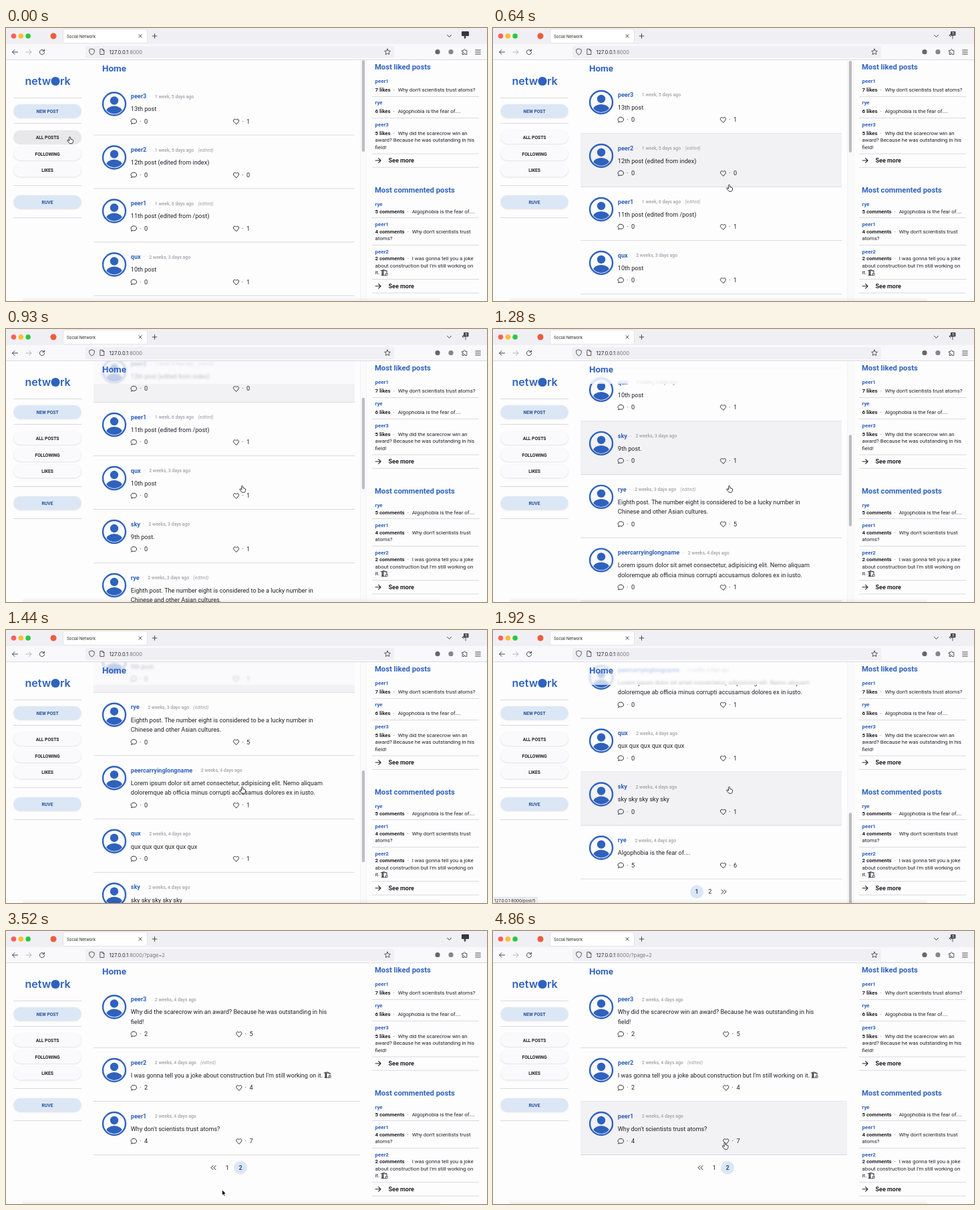
An HTML page with a canvas for the animation above (4890 ms loop, 720 by 408 pixels).

```html
<!DOCTYPE html>
<html lang="en">
<head>
<meta charset="utf-8">
<title>Social Network</title>
<style>
  html, body { margin: 0; width: 100%; height: 100%; overflow: hidden; background: #fdfdfe; }
  canvas { display: block; width: 720px; height: 408px; }
</style>
</head>
<body>
<canvas id="stage"></canvas>
<script>
const LOOP = 4890, PAGE_SWAP = 3200;
const BLUE = '#2f62bd', INK = '#222226', GRAY = '#a2a2a8', RULE = '#dadadf', PAPER = '#fdfdfe';
const ROBOTO = 'Roboto, sans-serif', INTER = 'Inter, sans-serif';

const canvas = document.getElementById('stage');
const ratio = window.devicePixelRatio || 1;
canvas.width = 720 * ratio;
canvas.height = 408 * ratio;
const ctx = canvas.getContext('2d');

const post = (name, time, lines, comments, likes, edited) =>
  ({ name, time, lines, comments, likes, edited, height: lines.length > 1 ? 94.5 : 80 });

const JOKE = "Why don't scientists trust atoms?";
const PAGES = [
  [
    post('peer3', '1 week, 5 days ago', ['13th post'], 0, 1),
    post('peer2', '1 week, 5 days ago', ['12th post (edited from index)'], 0, 0, true),
    post('peer1', '1 week, 6 days ago', ['11th post (edited from /post)'], 0, 1, true),
    post('qux', '2 weeks, 3 days ago', ['10th post'], 0, 1),
    post('sky', '2 weeks, 3 days ago', ['9th post.'], 0, 1),
    post('rye', '2 weeks, 3 days ago', ['Eighth post. The number eight is considered to be a lucky number in',
      'Chinese and other Asian cultures.'], 0, 5, true),
    post('peercarryinglongname', '2 weeks, 4 days ago', ['Lorem ipsum dolor sit amet consectetur, adipisicing elit. Nemo aliquam',
      'doloremque ab officia minus corrupti accusamus dolores ex in iusto.'], 0, 1),
    post('qux', '2 weeks, 4 days ago', ['qux qux qux qux qux qux'], 0, 1),
    post('sky', '2 weeks, 4 days ago', ['sky sky sky sky sky'], 0, 1),
    post('rye', '2 weeks, 4 days ago', ['Algophobia is the fear of....'], 5, 6)
  ],
  [
    post('peer3', '2 weeks, 4 days ago', ['Why did the scarecrow win an award? Because he was outstanding in his', 'field!'], 2, 5),
    post('peer2', '2 weeks, 4 days ago', ["I was gonna tell you a joke about construction but I'm still working on it. ^"], 2, 4, true),
    post('peer1', '2 weeks, 4 days ago', [JOKE], 4, 7)
  ]
];

// Motion keys: time, then values
const SCROLL = [[580, 0], [640, 2.4], [780, 45], [930, 130], [1060, 181], [1140, 197],
  [1280, 262], [1440, 386], [1540, 470], [1630, 537]];
const POINTER = [[30, 95.5, 163], [420, 353.5, 234.5], [2210, 353.5, 234.5], [2640, 323.5, 387],
  [4060, 323.5, 387], [4140, 323.5, 384], [4220, 323.5, 390], [4380, 323.5, 390], [4860, 347, 316.5]];
// Hovered posts: page, index, from, to
const HOVERS = [[0, 1, 130, 1100], [0, 4, 1100, 1630], [0, 8, 1630, 2390], [0, 9, 2390, 2540], [1, 2, 4700, 9999]];

const clamp = v => Math.max(0, Math.min(1, v));

function track(keys, t, col = 1) {
  const last = keys.length - 1;
  if (t <= keys[0][0]) return keys[0][col];
  if (t >= keys[last][0]) return keys[last][col];
  const i = keys.findIndex(k => k[0] > t) - 1;
  const rate = j => j < 0 || j >= last ? 0 : (keys[j + 1][col] - keys[j][col]) / (keys[j + 1][0] - keys[j][0]);
  const slope = j => rate(j - 1) * rate(j) > 0 ? (rate(j - 1) + rate(j)) / 2 : 0;
  const span = keys[i + 1][0] - keys[i][0], u = (t - keys[i][0]) / span, v = 1 - u;
  return keys[i][col] * v * v * (1 + 2 * u) + keys[i + 1][col] * u * u * (3 - 2 * u)
    + span * u * v * (slope(i) * v - slope(i + 1) * u);
}

// Draws text centred vertically on y; returns its right edge
function text(str, x, y, size, color = INK, style = '400', family = ROBOTO, align = 'left') {
  ctx.font = `${style} ${size}px ${family}`;
  ctx.fillStyle = color;
  ctx.textAlign = align;
  ctx.fillText(str, x, y + size * 0.355);
  return x + ctx.measureText(str).width;
}

function box(x, y, w, h, fill, radius = 0) {
  ctx.fillStyle = fill;
  ctx.beginPath();
  ctx.roundRect(x, y, w, h, radius);
  ctx.fill();
}

function disc(x, y, r, fill) {
  ctx.fillStyle = fill;
  ctx.beginPath();
  ctx.arc(x, y, r, 0, 7);
  ctx.fill();
}

function path(d, x, y, stroke = '#45454c', width = 1, fill) {
  ctx.save();
  ctx.translate(x, y);
  const shape = new Path2D(d);
  ctx.lineJoin = ctx.lineCap = 'round';
  if (fill) { ctx.fillStyle = fill; ctx.fill(shape); }
  if (width) { ctx.strokeStyle = stroke; ctx.lineWidth = width; ctx.stroke(shape); }
  ctx.restore();
}

const rule = (x, y, w) => box(x, y - 0.5, w, 1, RULE);

const ICON = {
  comment: 'M-3.5 3.6C-3 3 -2.9 2.6 -3 2.1C-5.6 -.2 -4 -3.8 0 -3.8C5.4 -3.8 5.7 3.1 .3 3.1C-.5 3.1 -1 3 -1.5 2.8Q-2.3 3.5 -3.5 3.6Z',
  heart: 'M0 4L-3.6 .4C-5.4 -1.7 -2.4 -5.3 0 -2.4C2.4 -5.3 5.4 -1.7 3.6 .4Z',
  crane: 'M-4 4H4M-3 4V-3L4 -2.4M-1.2 4V-3M-3 -3L-1.2 -1L-3 1L-1.2 4M-3 4L-1.2 1L-3 -1M4 -2.4V0M2.5 4V1H5V4M-3 -3L-1 -4.4L4 -2.4M-5 -3H-3',
  back: 'M4 0H-4M-.6 -3.4L-4 0L-.6 3.4',
  forward: 'M-4 0H4M.6 -3.4L4 0L.6 3.4',
  reload: 'M2.8 -2.2A3.6 3.6 0 1 0 3.6 .4M3.4 -4V-1.5H.9',
  cross: 'M-2.2 -2.2L2.2 2.2M2.2 -2.2L-2.2 2.2',
  plus: 'M-3.3 0H3.3M0 -3.3V3.3',
  shield: 'M0 -4.4L3.8 -3V0Q3.4 3 0 4.6Q-3.4 3 -3.8 0V-3Z',
  page: 'M-2.8 -4H.8L2.8 -2V4H-2.8ZM.8 -4V-2H2.8',
  star: 'M0 -4.3L1.3 -1.4L4.4 -1.1L2.1 1L2.7 4L0 2.5L-2.7 4L-2.1 1L-4.4 -1.1L-1.3 -1.4Z',
  puzzle: 'M-3.5 -2H-1.3V-3Q-.2 -5 1 -3V-2H3.3V4H.8Q.6 2 -.4 2.2T-1 4H-3.5V2Q-1.4 1.6 -1.6 .8T-3.5 .2Z',
  hand: 'M-1.1 .9A1.1 1.1 0 0 1 1.1 .9V3.1L4 3.8Q5.2 4.2 5.1 5.4L4.6 8Q4.3 9.4 3.4 9.7H.2Q-.8 9.3 -1.4 8.4L-3.7 5.3Q-3.8 4.2 -2.7 4.3L-1.1 5.4Z',
  arrow: 'M0 0V8L1.8 6.4L3.1 9.3L4.5 8.7L3.2 5.9L5.6 5.7Z'
};

function drawChrome(t, page) {
  box(0, 0, 720, 24, '#f0f0f4');
  box(0, 24, 720, 23, '#f9f9fb');
  box(0, 47, 720, 0.8, '#cfcfd6');
  ['#fe5f57', '#febc2e', '#28c840'].forEach((c, i) => disc(11.5 + i * 10.8, 12, 3.8, c));
  const loading = t >= 2980 && t < PAGE_SWAP;
  disc(71, 12, 4.5, '#ee5a3c');
  box(85.5, 1.5, 126, 21.5, '#d4d4da', 3);
  box(86, 2, 125, 20.5, '#fff', 2.5);
  text('Social Network', 91, 12.5, 6, INK, '400', INTER);
  path(ICON.cross, 201, 12, '#45454c', 0.9);
  path(ICON.plus, 222.5, 12);
  path('M-3 -1.5L0 1.5L3 -1.5', 663.5, 12);
  if (t < 60 || (t >= PAGE_SWAP && t < 3740)) {
    box(682, 5, 11, 7, '#37373b', 1);
    path('M0 0V3.5M-1 1.5H1', 687, 12, '#37373b', 1.5);
  } else {
    box(685, 5, 7.5, 6.5, '#4a4a50', 1);
    text('1', 688.7, 8.3, 5, '#fff', '700', INTER, 'center');
    path('M-5 -1H0V4M-3 -3L-5 -1L-3 1', 688, 12, '#4a4a50', 0.9);
  }
  path(ICON.back, 13.5, 36);
  path(ICON.forward, 34, 36, '#b4b4ba');
  path(loading ? ICON.cross : ICON.reload, 54, 36);
  box(119, 27, 462, 18, '#f0f0f4', 2.5);
  path(ICON.shield, 128.5, 35.5, '#45454c', 0.9);
  path(ICON.page, 144, 35.5, '#45454c', 0.9);
  const end = text('127.0.0.1', 154.5, 36, 7.5, INK, '400', INTER);
  text(':8000' + (page ? '/?page=2' : ''), end, 36, 7.5, '#75757c', '400', INTER);
  path(ICON.star, 571, 35.5, '#45454c', 0.9);
  disc(646, 35.7, 3.6, '#66666d');
  disc(666, 35.7, 3.6, '#85858c');
  path(ICON.puzzle, 686.5, 35.5, '#45454c', 0.9);
  path('M-3.8 -3H3.8M-3.8 0H3.8M-3.8 3H3.8', 706.5, 36);
}

function drawMenu(t) {
  text('netw', 28.5, 79, 16, BLUE, '600', INTER);
  disc(74, 79.5, 6.6, BLUE);
  text('rk', 81, 79, 16, BLUE, '600', INTER);
  [104.5, 142.5, 235.5, 283.5].forEach(y => rule(11, y, 102));
  const button = (label, y, fill, color) => {
    ctx.save();
    ctx.shadowColor = 'rgba(0,0,0,.13)';
    ctx.shadowBlur = 2 * ratio;
    ctx.shadowOffsetY = 0.8 * ratio;
    box(11.5, y - 10, 101, 20, fill, 10);
    ctx.restore();
    text(label, 62, y + 0.5, 6.7, color, '700', ROBOTO, 'center');
  };
  const shade = 1 - clamp((t - 60) / 140);
  button('NEW POST', 124, '#dce7f5', '#27509b');
  button('ALL POSTS', 163, `rgb(${250 - 18 * shade},${250 - 18 * shade},${252 - 17 * shade})`, INK);
  button('FOLLOWING', 188, '#fafafc', INK);
  button('LIKES', 212.5, '#fafafc', INK);
  button('RUVE', 260, '#dce7f5', '#27509b');
}

function drawSidebar() {
  const entry = (name, y, count, lines, step, ruleY) => {
    text(name, 552.5, y, 7.9, BLUE, '700');
    y += step;
    const end = text(count, 552.5, y, 7.9, INK, '700');
    text('·', end + 4.2, y, 7.9);
    text(lines[0], end + 11, y, 7.9);
    lines.slice(1).forEach((line, i) => text(line, 552.5, y + 10.5 * (i + 1), 7.9));
    rule(548, ruleY, 160);
  };
  const more = y => {
    path(ICON.forward, 557, y, INK, 1.1);
    text('See more', 572.5, y, 9, INK, '700');
    rule(548, y + 10.3, 160);
  };
  text('Most liked posts', 552, 58.5, 11.25, BLUE, '700');
  entry('peer1', 79, '7 likes', [JOKE], 13, 102.5);
  entry('rye', 111.5, '6 likes', ['Algophobia is the fear of....'], 13, 134.5);
  entry('peer3', 144, '5 likes', ['Why did the scarecrow win an', 'award? Because he was outstanding in his', 'field!'], 13, 188);
  more(198);
  text('Most commented posts', 552, 242.5, 11.25, BLUE, '700');
  entry('rye', 263.5, '5 comments', ['Algophobia is the fear of....'], 10.2, 283.5);
  entry('peer1', 293.5, '4 comments', ["Why don't scientists trust", 'atoms?'], 10.5, 324.5);
  entry('peer2', 334, '2 comments', ['I was gonna tell you a joke', "about construction but I'm still working on", 'it.'], 10.5, 375.5);
  path(ICON.crane, 566, 365.5, INK, 0.75);
  more(385.8);
}

function drawAvatar(x, y) {
  ctx.save();
  ctx.beginPath();
  ctx.arc(x, y, 17, 0, 7);
  ctx.strokeStyle = BLUE;
  ctx.lineWidth = 2.4;
  ctx.stroke();
  ctx.beginPath();
  ctx.arc(x, y, 15, 0, 7);
  ctx.clip();
  disc(x, y - 5, 6.2, BLUE);
  ctx.beginPath();
  ctx.ellipse(x, y + 12, 12.5, 9, 0, 0, 7);
  ctx.fill();
  ctx.restore();
}

function drawPost(p, y, right, shade) {
  if (shade) {
    ctx.save();
    ctx.globalAlpha *= shade;
    box(131, y, right - 131, p.height, '#f2f1f3');
    ctx.restore();
  }
  drawAvatar(162, y + 33.5);
  const nameEnd = text(p.name, 186.8, y + 22, 9.1, BLUE, '700');
  text('·', nameEnd + 4.2, y + 22, 7, GRAY);
  const timeEnd = text(p.time, nameEnd + 12.5, y + 22.3, 6.9, GRAY, '500');
  if (p.edited) text('(edited)', timeEnd + 6.3, y + 22.3, 6.9, GRAY, 'italic 400');
  p.lines.forEach((line, i) => {
    const end = text(line.replace('^', ''), 186.8, y + 41.2 + i * 14.3, 9.1);
    if (line.endsWith('^')) path(ICON.crane, end + 4.5, y + 40.5, INK, 0.8);
  });
  const foot = y + p.height - 20.3, heartX = right === 522 ? 344.5 : 348.8;
  path(ICON.comment, 191.3, foot, INK, 0.95);
  path(ICON.heart, heartX, foot, INK, 0.95);
  [[191.3, p.comments], [heartX, p.likes]].forEach(([x, n]) => {
    text('·', x + 8.8, foot, 9.1);
    text(String(n), x + 15.6, foot, 9.1);
  });
  rule(131, y + p.height, right - 131);
}

function drawPosts(t, page, scroll, right) {
  let y = 80 - scroll;
  PAGES[page].forEach((p, i) => {
    const shade = HOVERS.reduce((max, [pg, index, from, to]) => pg === page && index === i
      ? Math.max(max, clamp((t - from) / 110) * (1 - clamp((t - to) / 110))) : max, 0);
    if (y < 408 && y + p.height > 40) drawPost(p, y, right, shade);
    y += p.height;
  });
  const pager = y + 19.2;
  if (page) {
    path('M0 -3L-3 0L0 3M4 -3L1 0L4 3', 310, pager, INK);
    text('1', 331.3, pager, 9, INK, '400', ROBOTO, 'center');
    disc(351, pager, 10, '#dce7f5');
    text('2', 351, pager, 9, '#27509b', '700', ROBOTO, 'center');
  } else {
    disc(305, pager, 10, '#dce7f5');
    text('1', 305, pager, 9, '#27509b', '700', ROBOTO, 'center');
    text('2', 324.7, pager, 9, INK, '400', ROBOTO, 'center');
    path('M0 -3L3 0L0 3M-4 -3L-1 0L-4 3', 346, pager, INK);
  }
}

function clipped(y, h, draw) {
  ctx.save();
  ctx.beginPath();
  ctx.rect(131, y, 399, h);
  ctx.clip();
  draw();
  ctx.restore();
}

function drawFeed(t, page) {
  const scroll = page ? 0 : track(SCROLL, t), right = page ? 530 : 522;
  clipped(82, 326, () => drawPosts(t, page, scroll, right));
  // Frosted sticky heading
  if (scroll > 0) clipped(48, 34, () => {
    ctx.globalAlpha = 0.28;
    ctx.filter = `blur(${1.6 * ratio}px)`;
    drawPosts(t, page, scroll, right);
  });
  text('Home', 144, 60.3, 13.4, BLUE, '700');
  if (!page) {
    box(530.5, 48, 9, 360, '#ececef');
    box(531, 48, 8, 360, '#fafafb');
    box(532.8, 48 + scroll * 0.419, 4.2, 137, '#bdbdc1', 2.1);
  }
}

function drawStatus(t) {
  const address = t >= 1690 && t < 2300 ? '/post/5' : t >= 2600 && t < PAGE_SWAP ? '/?page=2' : '';
  if (!address) return;
  ctx.font = `400 6.2px ${INTER}`;
  const label = '127.0.0.1:8000' + address, width = ctx.measureText(label).width + 4;
  box(0, 399, width + 0.6, 9, '#c9c9cf', [0, 1.5, 0, 0]);
  box(0, 399.6, width, 9, '#f3f3f6', [0, 1.5, 0, 0]);
  text(label, 2, 404.3, 6.2, INK, '400', INTER);
}

function drawPointer(t, page) {
  const x = track(POINTER, t), y = track(POINTER, t, 2);
  const overLink = page ? y < 335 : (x < 113 || x > 131) && !(y > 372 && y < 383);
  if (overLink) path(ICON.hand, x, y, '#1c1c1e', 0.9, '#fff');
  else path(ICON.arrow, x, y, '#fff', 0.7, '#000');
}

function drawDesktopShade() {
  const g = ctx.createLinearGradient(0, 402, 0, 408);
  g.addColorStop(0, 'rgba(0,0,0,0)');
  g.addColorStop(1, 'rgba(0,0,0,.06)');
  ctx.fillStyle = g;
  ctx.fillRect(25, 402, 625, 6);
}

function frame(now) {
  const t = now % LOOP, page = t < PAGE_SWAP ? 0 : 1;
  ctx.setTransform(ratio, 0, 0, ratio, 0, 0);
  box(0, 0, 720, 408, PAPER);
  drawFeed(t, page);
  drawMenu(t);
  drawSidebar();
  drawChrome(t, page);
  drawDesktopShade();
  drawStatus(t);
  drawPointer(t, page);
}

const start = performance.now();
function loop() {
  frame(performance.now() - start);
  requestAnimationFrame(loop);
}
loop();
</script>
</body>
</html>
```
